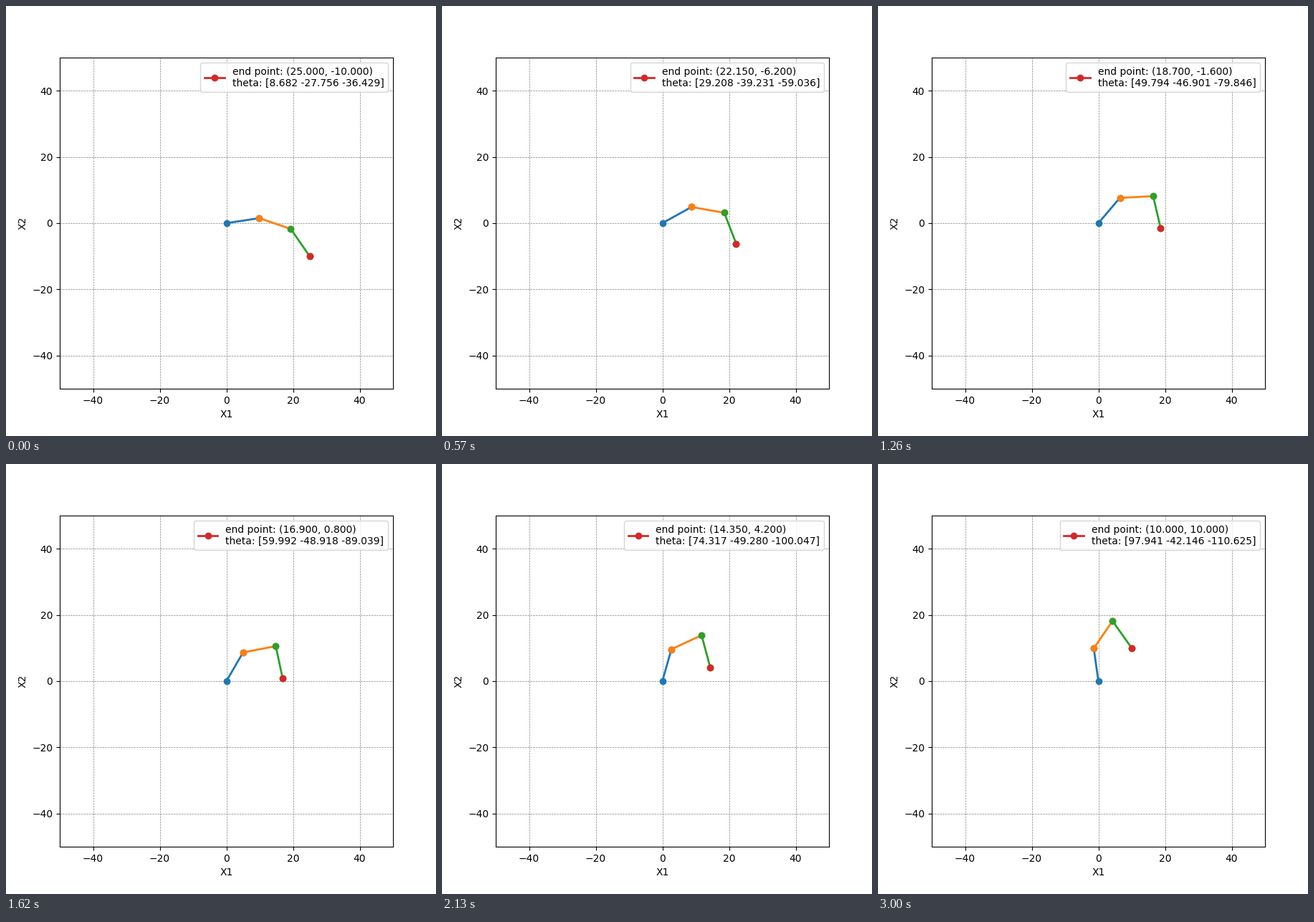
Recreate the animation shown at these times as a matplotlib script. Size 600 px wide and 600 px high, loop 3030 ms.

```python
import numpy as np
import matplotlib.pyplot as plt
from matplotlib.animation import FuncAnimation

FRAMES = 101
LINK = 10.0
START = np.radians((8.682, -27.756, -36.429))
PATH = np.linspace((25.0, -10.0), (10.0, 10.0), FRAMES)


def joints(theta):
    """Positions of the base, both elbows and the tip."""
    a = np.cumsum(theta)
    steps = LINK * np.column_stack((np.cos(a), np.sin(a)))
    return np.vstack(((0, 0), np.cumsum(steps, axis=0)))


def jacobian(pts):
    arms = pts[-1] - pts[:-1]
    return np.array((-arms[:, 1], arms[:, 0]))


def reach(theta, goal):
    """Newton steps with the pseudo-inverse until the tip is on the goal."""
    for _ in range(5):
        pts = joints(theta)
        theta = theta + np.linalg.pinv(jacobian(pts)) @ (goal - pts[-1])
    return theta


def solve_path():
    """Each pose is solved from the one before it."""
    poses = [START]
    for goal in PATH[1:]:
        poses.append(reach(poses[-1], goal))
    return poses


def label(i):
    x, y = PATH[i]
    angles = " ".join(f"{a:.3f}" for a in np.degrees(POSES[i]))
    return f"end point: ({x:.3f}, {y:.3f})\ntheta: [{angles}]"


POSES = solve_path()

fig, ax = plt.subplots(figsize=(6, 6), dpi=100)
ax.set(xlim=(-50, 50), ylim=(-50, 50), xlabel="X1", ylabel="X2")
ax.set_xticks(range(-40, 41, 20))
ax.set_yticks(range(-40, 41, 20))
ax.grid(color="gray", linestyle="--", linewidth=0.5)

parts = [ax.plot([], [], "o-", color=f"C{k}", linewidth=2)[0] for k in range(4)]
parts[-1].set_label(label(0))
legend = ax.legend(loc="upper right")
caption = legend.get_texts()[0]


def draw(i):
    pts = joints(POSES[i])
    for k, part in enumerate(parts):
        part.set_data(*pts[k:k + 2].T)
    caption.set_text(label(i))
    return [*parts, legend]


anim = FuncAnimation(fig, draw, frames=FRAMES, interval=30, repeat=True,
                     repeat_delay=0, blit=False)
plt.show()
```
